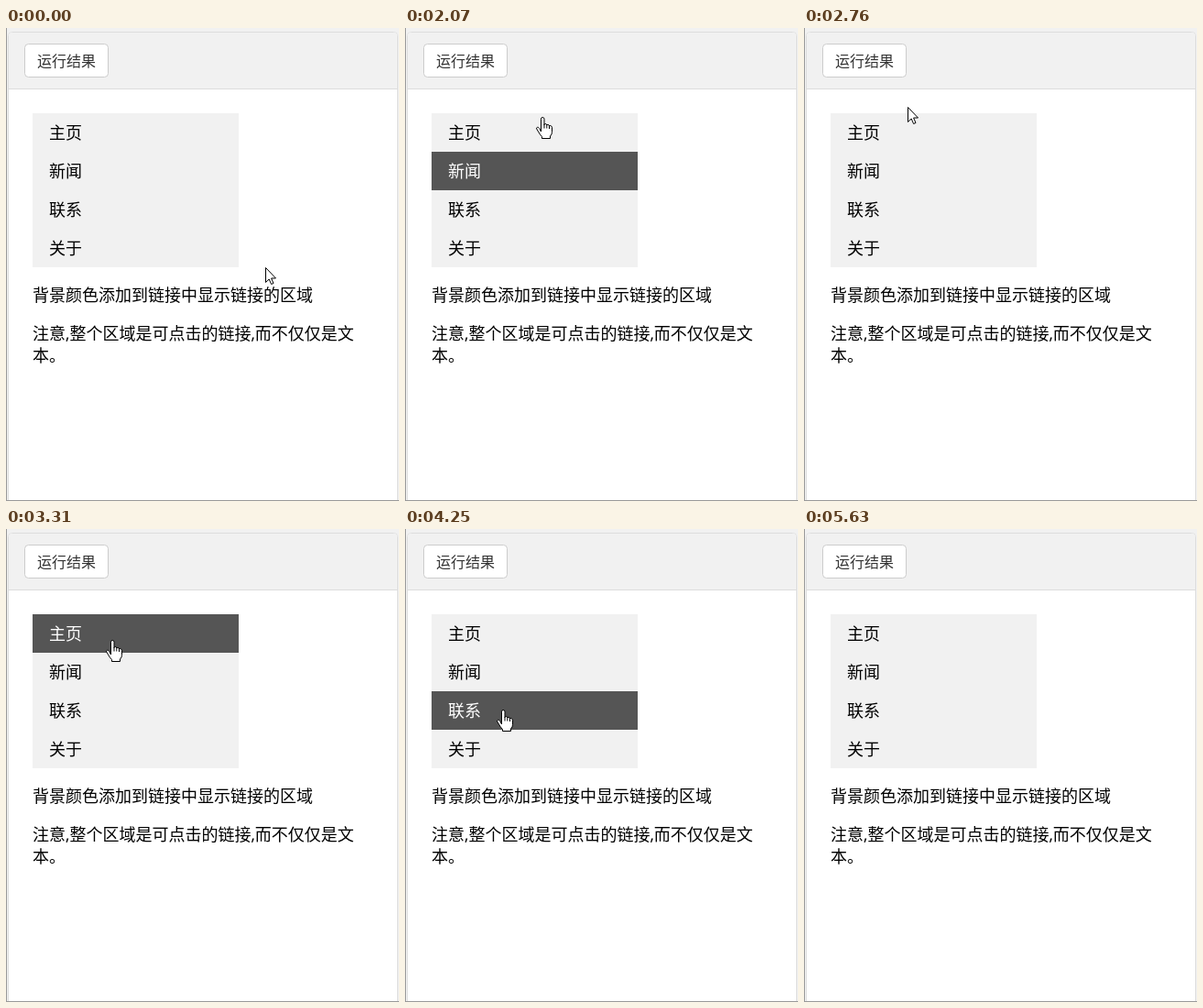
An HTML page that plays this animation: 429 px wide and 516 px high, repeating every 6070 ms.

```html
<!DOCTYPE html>
<html lang="zh-CN">
<head>
<meta charset="utf-8">
<title>菜单</title>
<style>
html, body { margin: 0; width: 100%; height: 100%; overflow: hidden; background: #fff; }
svg { display: block; }
text { font: 18px "Open Sans", "Noto Sans CJK SC", "Noto Sans CJK", sans-serif; }
#button text { font-size: 16px; fill: #333; }
#button rect { fill: #fff; stroke: #ccc; }
#button.on rect { fill: #e6e6e6; stroke: #adadad; }
#menu rect { fill: #f1f1f1; }
#menu .on rect { fill: #555; }
#menu .on text { fill: #fff; }
.cursor { display: none; fill: #fff; stroke: #000; stroke-linejoin: round; }
</style>
</head>
<body>
<svg width="429" height="516" viewBox="0 0 429 516">
  <rect width="429" height="516" fill="#f1f1f1"/>
  <path d="M2.5 520V8.5q0-4 4-4H423.5q4 0 4 4V520z" fill="#fff" stroke="#ddd"/>
  <path d="M3 66V8.5q0-3.5 3.5-3.5H423.5q3.5 0 3.5 3.5V66z" fill="#f1f1f1"/>
  <path d="M3 66.5H427" stroke="#ddd"/>
  <path d="M.5 0V516M0 515.5H429" stroke="#999"/>
  <g id="button">
    <rect x="20.5" y="17.5" width="91" height="36" rx="4"/>
    <text x="34" y="42">运行结果</text>
  </g>
  <g id="menu"></g>
  <text x="29" y="298">背景颜色添加到链接中显示链接的区域</text>
  <text x="29" y="340">注意,整个区域是可点击的链接,而不仅仅是文</text>
  <text x="29" y="364">本。</text>
  <path class="cursor" id="arrow" d="M.5.5V16.5L4.2 13 6.6 18.5 9 17.5 6.6 12H11.5z"/>
  <g class="cursor" id="hand">
    <path d="M5.5 16V2.2Q5.5.5 7.2.5T9 2.2V8.5Q9 7.5 10.3 7.5T11.8 9Q12 8.3 13.1 8.4T14.5 10Q14.7 9.3 15.8 9.5T17.5 11.3V16.5Q17.5 19 15.5 21V23.5H6.5V21.5Q4 19 2.5 16L.7 13Q.3 11.6 1.5 11.3T3.6 12.4z"/>
    <path d="M9 8V12.5M11.8 9V12.5M14.5 10V13" fill="none"/>
  </g>
  <path class="cursor" id="beam" d="M0 .5H3M4 .5H7M3.5 1V15M0 15.5H3M4 15.5H7"/>
</svg>
<script>
const $ = id => document.getElementById(id);
const LOOP = 6070, BUTTON = 4;

$("menu").innerHTML = ["主页", "新闻", "联系", "关于"].map((label, i) =>
  `<g><rect x="29" y="${93 + 42 * i}" width="225" height="42"/>` +
  `<text x="47" y="${121 + 42 * i}">${label}</text></g>`).join("");
const targets = [...$("menu").children, $("button")];
const cursors = ["arrow", "hand", "beam"].map($);

const steps = [
  [0, "arrow", 283, 261],
  [560, "arrow", 281, 261],
  [1530, "beam", 280, 283],
  [1650, "arrow", 300, 401],
  [1800, "arrow", 300, 403],
  [1950, "hand", 182, 155],
  [2070, "hand", 143, 97, 1],
  [2220, "hand", 94, 51],
  [2370, "arrow", 104, 59, BUTTON],
  [2520, "arrow", 109, 70],
  [2640, "arrow", 112, 80],
  [2760, "arrow", 113, 86],
  [2880, "hand", 109, 96, 0],
  [3040, "hand", 109, 101, 0],
  [3190, "hand", 109, 111, 0],
  [3310, "hand", 109, 121, 0],
  [3460, "hand", 108, 137, 1],
  [3590, "hand", 107, 148, 1],
  [3740, "hand", 106, 160, 1],
  [3860, "hand", 105, 171, 1],
  [3980, "hand", 103, 181, 2],
  [4130, "hand", 101, 190, 2],
  [4250, "hand", 100, 197, 2],
  [4400, "hand", 99, 222, 3],
  [4520, "hand", 98, 236, 3],
  [4800, "hand", 98, 237, 3],
  [4940, "hand", 132, 236, 3],
  [5060, "arrow", 191, 264, 3],
  [5180, "beam", 270, 282],
  [5330, "beam", 302, 290],
  [5480, "arrow", 324, 391],
  [5630, "none", 0, 0],
];

function draw(time) {
  const [, shape, x, y, hovered] = steps.findLast(step => step[0] <= time);
  targets.forEach((el, i) => el.classList.toggle("on", i === hovered));
  for (const el of cursors) {
    el.style.display = el.id === shape ? "inline" : "none";
    el.setAttribute("transform", `translate(${x} ${y})`);
  }
}

const start = performance.now();
function tick() {
  draw((performance.now() - start) % LOOP);
  requestAnimationFrame(tick);
}
tick();
</script>
</body>
</html>
```
